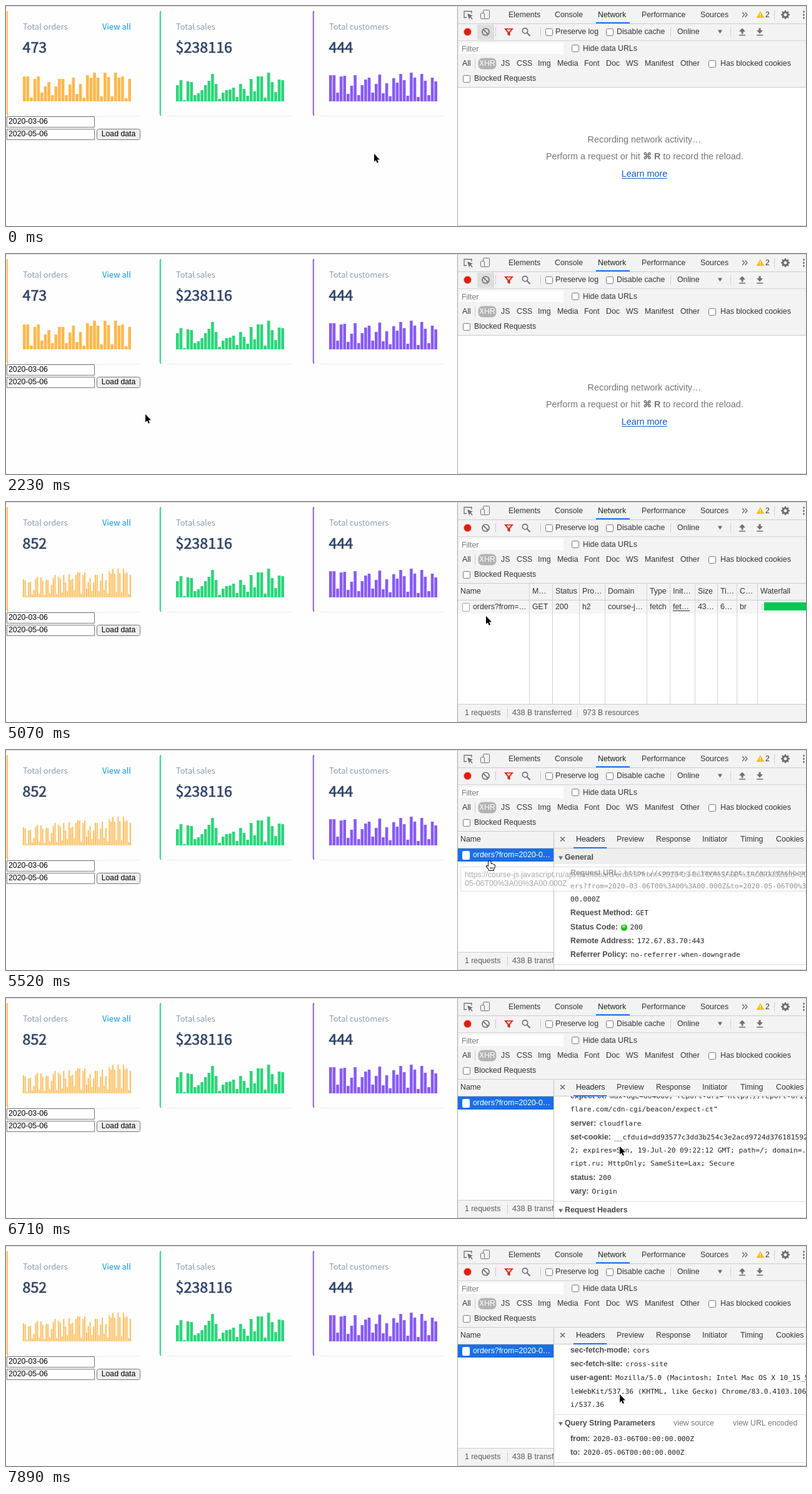
Animation of 1280 by 353 pixels, one loop 8 s. Source, as an HTML page with a canvas:

```html
<!DOCTYPE html>
<html lang="en">
<head>
<meta charset="utf-8">
<title>Dashboard and network panel</title>
<style>
html, body { margin: 0; width: 100%; height: 100%; overflow: hidden; background: #fff; }
canvas { display: block; width: 1280px; height: 353px; }
</style>
</head>
<body>
<canvas id="stage" width="1280" height="353"></canvas>
<script>
const ctx = document.getElementById('stage').getContext('2d');
const LOOP = 8000;
const SANS = '"Liberation Sans", Arial, sans-serif';
const UI = `12.3px ${SANS}`;
const BOLD = `bold 12.3px ${SANS}`;
const MONO = '11.2px "DejaVu Sans Mono", monospace';
const CARD = '"Noto Sans CJK JP", "Noto Sans CJK SC", "Noto Sans CJK", sans-serif';
const INK = '#333', GREY = '#777', LINE = '#ccc', CHROME = '#f3f3f3';

const MONTH = [40,40,6,36,40,14,24,31,10,24,36,36,10,27,38,12,28,6,42,38,46,38,8,46,39,8,46,38,40,5,36];
const EARLIER = [29,27,3,24,25,5,12,30,33,6,32,26,4,28,27,7,20,31,36,5,33,30,8,36,24,10,37,28,30,12,36];
const SALES = [26,34,2,32,31,10,13,18,26,33,44,28,4,14,18,19,22,7,28,20,9,36,16,40,40,6,46,31,15,35,34];
const CUSTOMERS = [42,42,14,40,41,12,25,42,10,26,35,38,14,28,43,13,29,8,37,30,44,34,9,46,38,7,44,33,10,38,32];

// time, x, y of the pointer; each pose holds until the next
const POINTER = [
  [0, 588, 236], [1190, 584, 237],
  [1780, 480, 298], [1930, 345, 321], [2080, 245, 285], [2230, 222, 256],
  [2530, 219, 250], [2680, 206, 226], [2830, 194, 207], [2980, 192, 205],
  [4330, 260, 210], [4480, 540, 216], [4630, 742, 208],
  [4930, 765, 187], [5070, 767, 182], [5220, 771, 178], [5370, 774, 178],
  [5660, 838, 200], [5810, 945, 228], [5960, 981, 237]
];
// time, share of the way to the first and to the second resting point
const SCROLL = [
  [0, 0, 0], [6410, .2, 0], [6560, .65, 0], [6710, 1, 0],
  [6850, 1, .4], [7000, 1, .72], [7150, 1, .88], [7600, 1, .95], [7890, 1, 1]
];
const at = (keys, t) => keys.filter(k => k[0] <= t).pop();

const SECTIONS = [
  ['General', [
    ['Request URL', 'https://course-js.javascript.ru/api/dashboard/ord',
      'ers?from=2020-03-06T00%3A00%3A00.000Z&to=2020-05-06T00%3A00%3A', '00.000Z'],
    ['Request Method', 'GET'],
    ['Status Code', '200'],
    ['Remote Address', '172.67.83.70:443'],
    ['Referrer Policy', 'no-referrer-when-downgrade']]],
  ['Response Headers', [
    ['access-control-allow-origin', '*'],
    ['cf-cache-status', 'DYNAMIC'],
    ['content-encoding', 'br'],
    ['content-type', 'application/json; charset=utf-8'],
    ['date', 'Fri, 19 Jun 2020 09:22:12 GMT'],
    ['expect-ct', 'max-age=604800, report-uri="https://report-uri.cloud', 'flare.com/cdn-cgi/beacon/expect-ct"'],
    ['server', 'cloudflare'],
    ['set-cookie', '__cfduid=dd93577c3dd3b254c3e2acd9724d37618159255853',
      '2; expires=Sun, 19-Jul-20 09:22:12 GMT; path=/; domain=.javasc', 'ript.ru; HttpOnly; SameSite=Lax; Secure'],
    ['status', '200'],
    ['vary', 'Origin']]],
  ['Request Headers', [
    [':authority', 'course-js.javascript.ru'],
    [':method', 'GET'],
    [':path', '/api/dashboard/orders?from=2020-03-06T00%3A00%3A00.000', 'Z&to=2020-05-06T00%3A00%3A00.000Z'],
    [':scheme', 'https'],
    ['accept', '*/*'],
    ['accept-encoding', 'gzip, deflate, br'],
    ['accept-language', 'en-US,en;q=0.9'],
    ['cache-control', 'no-cache'],
    ['pragma', 'no-cache'],
    ['sec-fetch-dest', 'empty'],
    ['sec-fetch-mode', 'cors'],
    ['sec-fetch-site', 'cross-site'],
    ['user-agent', 'Mozilla/5.0 (Macintosh; Intel Mac OS X 10_15_5) App',
      'leWebKit/537.36 (KHTML, like Gecko) Chrome/83.0.4103.106 Safar', 'i/537.36']]],
  ['Query String Parameters', [
    ['from', '2020-03-06T00:00:00.000Z'],
    ['to', '2020-05-06T00:00:00.000Z']]]
];

function rect(x, y, w, h, color) {
  ctx.fillStyle = color;
  ctx.fillRect(x, y, w, h);
}
function text(s, x, y, color = INK, font = UI, align = 'left') {
  ctx.font = font;
  ctx.fillStyle = color;
  ctx.textAlign = align;
  ctx.fillText(s, x, y);
  return ctx.measureText(s).width;
}
function labels(y, pairs, color) {
  for (const [s, x] of pairs) text(s, x, y, color);
}
function box(x, y, w, h, r, fill, stroke) {
  ctx.beginPath();
  ctx.roundRect(x + .5, y + .5, w - 1, h - 1, r);
  ctx.lineWidth = 1;
  if (fill) { ctx.fillStyle = fill; ctx.fill(); }
  if (stroke) { ctx.strokeStyle = stroke; ctx.stroke(); }
}
function stroke(color, width, ...lines) {
  ctx.strokeStyle = color;
  ctx.lineWidth = width;
  ctx.beginPath();
  for (const points of lines) points.forEach(([x, y], i) => i ? ctx.lineTo(x, y) : ctx.moveTo(x, y));
  ctx.stroke();
}
function shape(points, color) {
  ctx.beginPath();
  points.forEach(([x, y]) => ctx.lineTo(x, y));
  ctx.closePath();
  ctx.fillStyle = color;
  ctx.fill();
}
function circle(x, y, r, fill, line, width = 1.5) {
  ctx.beginPath();
  ctx.arc(x, y, r, 0, 7);
  if (fill) { ctx.fillStyle = fill; ctx.fill(); }
  if (line) { ctx.strokeStyle = line; ctx.lineWidth = width; ctx.stroke(); }
}
const checkbox = (x, y) => box(x, y, 12, 12, 2, '#fff', GREY);

function card(x, title, value, color, heights) {
  ctx.strokeStyle = color;
  ctx.lineWidth = 2;
  ctx.beginPath();
  ctx.moveTo(x + 3, 8.5);
  ctx.quadraticCurveTo(x + 1.8, 9, x + 1.8, 12);
  ctx.lineTo(x + 1.8, 172);
  ctx.quadraticCurveTo(x + 1.8, 175, x + 3, 175.5);
  ctx.stroke();
  rect(x + 12, 176, 201, 1, '#efefef');
  rect(x + 16, 177, 194, 1, '#f7f7f7');
  ctx.textBaseline = 'alphabetic';
  text(title, x + 27, 38, '#8f9ab0', `12.9px ${CARD}`);
  text(value, x + 26.5, 74.5, '#2e4369', `23.3px ${CARD}`);
  ctx.strokeStyle = '#2e4369';
  ctx.lineWidth = .7;
  ctx.strokeText(value, x + 26.5, 74.5);
  ctx.textBaseline = 'middle';
  const pitch = 174 / heights.length;
  heights.forEach((h, i) => rect(x + 27 + i * pitch, 153 - h, pitch - 1, h, color));
}

function page(loaded, pressed) {
  rect(0, 0, 722, 353, '#fefefe');
  card(0, 'Total orders', loaded ? '852' : '473', '#ffb84d', loaded ? EARLIER.concat(MONTH) : MONTH);
  card(245, 'Total sales', '$238116', '#2ed47a', SALES);
  card(490, 'Total customers', '444', '#885af8', CUSTOMERS);
  ctx.textBaseline = 'alphabetic';
  text('View all', 200, 38, '#0b93ea', `12.9px ${CARD}`, 'right');
  ctx.textBaseline = 'middle';
  box(1, 177, 141, 18, 0, '#fff', '#767676');
  box(1, 197, 141, 18, 0, '#fff', '#767676');
  text('2020-03-06', 4, 186, '#000');
  text('2020-05-06', 4, 206, '#000');
  box(145, 197, 70, 18, 3, pressed ? '#dcdcdc' : '#efefef', pressed ? '#4f4f4f' : '#767676');
  text('Load data', 180, 206, '#000', UI, 'center');
}

function tabIcons() {
  const c = '#6e6e6e';
  stroke(c, 1.3, [[737, 18.5], [733, 18.5], [733, 8.5], [745, 8.5], [745, 12]]);
  shape([[738, 12], [747, 15.5], [743.5, 17], [747, 20.5], [745.8, 21.6], [742.4, 18.2], [741, 21.5]], c);
  box(763, 6, 11, 15, 1, null, c);
  box(759, 11, 7, 10, 1, CHROME, c);
  stroke(c, 1.4, [[1178, 10], [1181.5, 14], [1178, 18]], [[1182.5, 10], [1186, 14], [1182.5, 18]]);
  shape([[1207, 8], [1213, 19], [1201, 19]], '#f4bd00');
  rect(1206.4, 11.5, 1.3, 4, '#fff');
  rect(1206.4, 16.5, 1.3, 1.3, '#fff');
  text('2', 1215, 14.5);
  rect(1229, 7, 1, 15, LINE);
  circle(1247, 14, 4, null, c, 3);
  for (let i = 0; i < 8; i++) {
    const a = i * Math.PI / 4, dx = Math.cos(a), dy = Math.sin(a);
    stroke(c, 2.4, [[1247 + 4 * dx, 14 + 4 * dy], [1247 + 7 * dx, 14 + 7 * dy]]);
  }
  for (const y of [9, 14, 19]) circle(1276.5, y, 1.5, c);
}

function toolbarIcons(clearLit) {
  const c = '#6e6e6e';
  circle(738.5, 41.5, 7, '#f4c9c5');
  circle(738.5, 41.5, 5.7, '#d91e0b');
  if (clearLit) rect(754, 30, 27, 24, '#dedede');
  circle(767.5, 41.5, 5.5, null, c, 1.7);
  stroke(c, 1.7, [[763.8, 37.8], [771.2, 45.2]]);
  shape([[797, 36], [812, 36], [806.5, 42.5], [806.5, 48], [802.5, 46], [802.5, 42.5]], '#d91e0b');
  shape([[800.5, 37.5], [808.5, 37.5], [804.5, 42]], '#f6d3cf');
  circle(830.5, 39.8, 4.2, null, c, 1.6);
  stroke(c, 2, [[833.5, 43], [838.5, 48]]);
  shape([[1139, 38.5], [1146, 38.5], [1142.5, 44.5]], c);
  for (const [x, tip, base] of [[1178, 35.5, 41], [1206, 44.5, 39]]) {
    shape([[x, tip], [x + 5, base], [x - 5, base]], c);
    rect(x - 1.5, tip < base ? 40 : 35.5, 3, 4.5, c);
    rect(x - 5, 46, 10, 1.5, c);
  }
  for (const x of [783, 855, 1063, 1159]) rect(x, 34, 1, 15, LINE);
}

function devtoolsTop(clearLit) {
  rect(722, 0, 558, 353, '#fff');
  rect(722, 0, 558, 130, CHROME);
  rect(722, 28, 558, 1, LINE);
  rect(722, 55, 558, 1, '#d5d5d5');
  rect(722, 130, 558, 1, LINE);
  labels(14.5, [['Elements', 804], ['Console', 878], ['Performance', 1017], ['Sources', 1111]]);
  text('Network', 947, 14.5, '#222');
  rect(944, 26, 54, 2, '#1a73e8');
  tabIcons();
  toolbarIcons(clearLit);
  for (const [x, y] of [[863, 36], [960, 36], [905, 62], [1124, 87], [731, 111]]) checkbox(x, y);
  labels(42, [['Preserve log', 879], ['Disable cache', 977], ['Online', 1074]]);
  rect(726, 59, 166, 18, '#fff');
  text('Filter', 729, 70, GREY);
  text('Hide data URLs', 923, 69);
  rect(750, 85, 1, 15, LINE);
  box(755, 83, 30, 19, 7, '#b3b3b3');
  text('XHR', 770, 93, '#fff', UI, 'center');
  labels(93, [['All', 730], ['JS', 792], ['CSS', 817], ['Img', 851], ['Media', 882], ['Font', 925], ['Doc', 960],
    ['WS', 992], ['Manifest', 1022], ['Other', 1079], ['Has blocked cookies', 1143]]);
  text('Blocked Requests', 749, 117);
}

function emptyPanel() {
  const font = `14.35px ${SANS}`;
  text('Recording network activity…', 1021.5, 215, GREY, font, 'center');
  let x = 864;
  for (const [s, f] of [['Perform a request or hit ', font], ['⌘ R', 'bold ' + font], [' to record the reload.', font]])
    x += text(s, x, 242.5, GREY, f);
  text('Learn more', 1021.5, 270, '#1155cc', font, 'center');
  rect(985, 276, 73, 1, '#1155cc');
}

function fileIcon(selected) {
  box(730, 162, 12, 14, 1.5, '#fff', selected ? '#fff' : '#a5a5a5');
}
function footer() {
  rect(723, 324, 557, 29, CHROME);
  rect(723, 324, 557, 1, LINE);
  labels(339, [['1 requests', 734], ['438 B transferred', 810], ['973 B resources', 923]], '#5a5a5a');
  rect(802, 331, 1, 15, LINE);
  rect(914, 331, 1, 15, LINE);
}

function requestTable() {
  rect(723, 131, 557, 26, CHROME);
  rect(723, 157, 557, 1, LINE);
  rect(723, 158, 557, 21, '#f5f5f5');
  const columns = [['Name', 'orders?from=…', 727], ['M…', 'GET', 842], ['Status', '200', 879], ['Pro…', 'h2', 922],
    ['Domain', 'course-j…', 963], ['Type', 'fetch', 1030], ['Init…', 'fet…', 1067], ['Size', '43…', 1107],
    ['Ti…', '6…', 1143], ['C…', 'br', 1174], ['Waterfall', '', 1207]];
  columns.forEach(([head, cell, x], i) => {
    if (i) rect(x - 5, 131, 1, 193, '#d2d2d2');
    text(head, x, 143.5);
    text(cell, i ? x : 747, 168.5);
  });
  rect(1067, 174, 27, 1, INK);
  fileIcon(false);
  box(1209, 164, 5, 8, 0, '#fff', LINE);
  rect(1213, 161, 67, 13, '#00c853');
  footer();
}

function layout() {
  const items = [], anchors = {};
  let y = 173;
  for (const [title, rows] of SECTIONS) {
    items.push({ title, y });
    y += 24.5;
    for (const [key, ...lines] of rows) {
      anchors[key] = y;
      lines.forEach((value, i) => items.push({ key: i ? '' : key + ':', value, y: y + i * 21.4 }));
      y += (lines.length - 1) * 21.4 + 22.1;
    }
    y += 7.9;
  }
  items.push({ title: '', y });
  return { items, first: anchors['expect-ct'] - 158, second: anchors['sec-fetch-mode'] - 168 };
}
const details = layout();

function sectionHead(title, y) {
  if (title === 'General') rect(877, y - 15, 403, 25, '#eee');
  else rect(877, y - 15, 403, 1, '#ddd');
  if (!title) return;
  shape([[884, y - 2.5], [891, y - 2.5], [887.5, y + 3.5]], '#6e6e6e');
  text(title, 894, y, '#4a4a4a', BOLD);
  if (title.startsWith('Query')) labels(y, [['view source', 1068], ['view URL encoded', 1163]], GREY);
}

function detailPanel(scroll) {
  rect(723, 131, 557, 222, '#fff');
  footer();
  rect(723, 131, 557, 26, CHROME);
  rect(723, 157, 557, 1, LINE);
  text('Name', 727, 143.5);
  rect(723, 158, 153, 21, '#1a6fe8');
  text('orders?from=2020-0…', 747, 168.5, '#fff');
  fileIcon(true);

  ctx.save();
  ctx.beginPath();
  ctx.rect(876, 158, 404, 195);
  ctx.clip();
  rect(876, 158, 404, 195, '#fff');
  for (const { title, key, value, y: docY } of details.items) {
    const y = Math.round(docY - scroll);
    if (y < 130 || y > 375) continue;
    if (title !== undefined) { sectionHead(title, y); continue; }
    let x = 903;
    if (key) x += text(key, x, y, '#4a4a4a', BOLD) + 5;
    if (key === 'Status Code:') { circle(989, y, 5.2, '#1fc11f'); circle(988.5, y - 2, 2.6, '#7fe57a'); x = 998.5; }
    text(value, x, y, '#222', MONO);
  }
  ctx.restore();

  rect(876, 131, 1, 222, '#bbb');
  stroke('#5a5a5a', 1.3, [[887, 139.5], [894, 146.5]], [[894, 139.5], [887, 146.5]]);
  text('Headers', 912, 143.5, '#222');
  rect(908, 156, 53, 2, '#1a73e8');
  labels(143.5, [['Preview', 977], ['Response', 1040], ['Initiator', 1114], ['Timing', 1175], ['Cookies', 1232]]);
}

function tooltip() {
  ctx.globalAlpha = .5;
  box(727, 187, 570, 40, 0, '#fff', '#bbb');
  text('https://course-js.javascript.ru/api/dashboard/orders?from=2020-03-06T00%3A00%3A00.000Z&to=2020-', 734, 201, '#555');
  text('05-06T00%3A00%3A00.000Z', 734, 214.5, '#555');
  ctx.globalAlpha = 1;
}

function outlined(points, fill, line, width) {
  ctx.beginPath();
  points.forEach(([x, y]) => ctx.lineTo(x, y));
  ctx.closePath();
  ctx.lineJoin = 'round';
  ctx.strokeStyle = line;
  ctx.lineWidth = width;
  ctx.stroke();
  ctx.fillStyle = fill;
  ctx.fill();
}
function pointer(x, y, hand) {
  ctx.save();
  ctx.translate(x, y);
  if (hand) {
    outlined([[-2, 1], [0, 0], [1.5, 1.5], [2, 5], [4, 4.8], [5.5, 5.6], [7.5, 6.4], [8, 8], [7.5, 11], [6, 13], [6, 15],
      [-1, 15], [-2, 12.5], [-5, 9], [-4.5, 7.8], [-2, 9]], '#fff', '#000', 2);
    stroke('#000', .8, [[1, 10], [1, 13]], [[3, 10], [3, 13]], [[5, 10], [5, 12.5]]);
  } else {
    outlined([[1, 1], [1, 14], [3.9, 11.3], [5.9, 16], [7.9, 15.1], [6, 10.6], [10, 10.6]], '#000', '#fff', 1.6);
  }
  ctx.restore();
}

function draw(t) {
  const loaded = t >= 3280;
  page(loaded, t >= 2980 && t < 4330);
  devtoolsTop(!loaded);
  if (!loaded) emptyPanel();
  else if (t < 5370) requestTable();
  else {
    const [, a, b] = at(SCROLL, t);
    detailPanel(a * details.first + b * (details.second - details.first));
  }
  if (t >= 5520 && t < 5660) tooltip();
  rect(722, 0, 1, 353, '#a5a5a5');
  rect(0, 0, 1280, 1, '#d8d8d8');
  rect(722, 352, 558, 1, '#d0d0d0');
  const [, x, y] = at(POINTER, t);
  pointer(x, y, t >= 5220 && t < 5660);
}

ctx.textBaseline = 'middle';
const start = performance.now();
function tick() {
  draw((performance.now() - start) % LOOP);
  requestAnimationFrame(tick);
}
tick();
</script>
</body>
</html>
```
